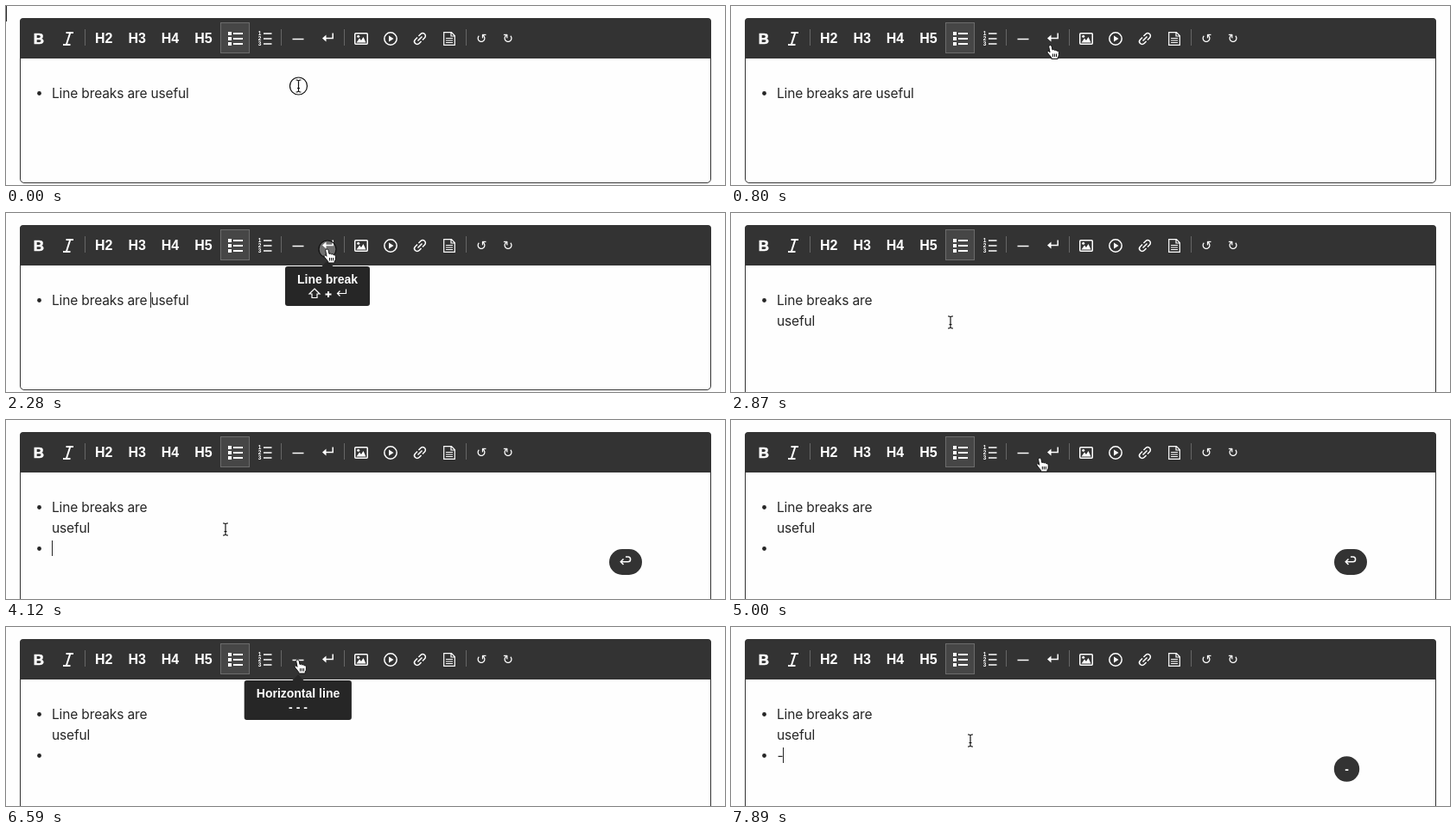
An HTML page for the animation above (8 s loop, 832 px wide and 208 px high).

```html
<!DOCTYPE html>
<html lang="en">
<head>
<meta charset="utf-8">
<title>Editor line breaks</title>
<style>
html, body { margin: 0; width: 100%; height: 100%; overflow: hidden; background: #fefefe; }
svg { display: block; width: 832px; height: 208px; }
.body { font: 15.5px Inter, sans-serif; letter-spacing: -0.14px; fill: #262626; }
.bold { font: bold 16px "Liberation Sans", Arial, sans-serif; fill: #fff; text-anchor: middle; }
.tip { font-size: 14px; }
.icon { fill: none; stroke: #fff; stroke-width: 1.5; }
.thin { stroke-width: 1.2; }
.thick { stroke-width: 2; }
.solid { fill: #fff; stroke: none; }
.digit { font: bold 6.5px "Liberation Sans", Arial, sans-serif; fill: #fff; }
.turn { font: 15px "DejaVu Sans", sans-serif; fill: #fff; text-anchor: middle; }
</style>
</head>
<body>
<svg viewBox="0 0 832 208" xmlns="http://www.w3.org/2000/svg">
  <rect id="frame" x="16.5" y="14.5" width="799" height="191" rx="4.5" fill="#fefefe" stroke="#333"/>
  <path d="M16 61V18a4 4 0 0 1 4-4H812a4 4 0 0 1 4 4V61Z" fill="#333"/>
  <rect x="248.5" y="19.5" width="33" height="35" fill="#464646" stroke="#6c6c6c"/>
  <path d="M91.5 27V46M318.5 27V46M391.5 27V46M532.5 27V46" stroke="#666"/>

  <g class="bold">
    <text x="38" y="44" font-size="17" stroke="#fff" stroke-width=".5">B</text>
    <text x="113.3" y="43">H2</text>
    <text x="151.7" y="43">H3</text>
    <text x="190" y="43">H4</text>
    <text x="228.5" y="43">H5</text>
  </g>
  <g class="icon">
    <path class="thick" d="M69.5 31H78M66 45H74.5M74.3 31L69.8 45"/>
    <path class="solid" d="M257 30h4v4h-4zM257 36h4v4h-4zM257 42h4v4h-4z"/>
    <path class="thick" d="M263 32H274M263 38H274M263 44H274"/>
    <path d="M298 32H307.5M298 38H307.5M298 44H307.5"/>
    <path d="M331.5 38.5H344.5"/>
    <path d="M378.2 31.5V37.5H369"/>
    <path class="solid" d="M366 37.5L370.5 33.5V41.5Z"/>
    <rect x="403.75" y="31.75" width="14.5" height="12.5" rx="1"/>
    <path class="solid" d="M405.5 42.5L409 37.5L411 40L413.5 36L416.5 42.5Z"/>
    <circle class="solid" cx="407.7" cy="35.3" r="1.5"/>
    <circle cx="445" cy="38" r="7.2"/>
    <path class="solid" d="M443 34.5V41.5L448.5 38Z"/>
    <path transform="translate(479 38) rotate(-45)" d="M-1 -3.2H-4.5a3.2 3.2 0 0 0 0 6.4H-1M1 -3.2H4.5a3.2 3.2 0 0 1 0 6.4H1M-3.5 0H3.5"/>
    <path class="thin" d="M506.7 30.7H515.5L519.3 34.5V45.4H506.7ZM515 31V35H519M509 37.5H517M509 40H517M509 42.5H517"/>
  </g>
  <g class="digit">
    <text x="291.8" y="34.3">1</text><text x="291.8" y="40.3">2</text><text x="291.8" y="46.3">3</text>
  </g>
  <g class="turn">
    <text x="550.3" y="43">↺</text><text x="580.8" y="43">↻</text>
  </g>

  <g class="body">
    <circle cx="38.5" cy="101.5" r="2.4"/>
    <text id="line1" x="53" y="107"></text>
    <text id="line2" x="53" y="131">useful</text>
    <circle id="bullet" cx="38.5" cy="149.5" r="2.4"/>
    <text id="dash" x="53.5" y="155">-</text>
    <rect id="caret" width="1" height="18"/>
  </g>

  <g id="enterKey">
    <rect x="698" y="150" width="38" height="30" rx="15" fill="#333"/>
    <path class="icon" d="M714.5 161.5L711.3 164.7L714.5 168M711.3 164.7H719.8a2.8 2.8 0 0 0 0 -5.6H717"/>
  </g>
  <g id="dashKey">
    <circle cx="712.5" cy="165" r="14.7" fill="#333"/>
    <text class="bold tip" x="712.5" y="170">-</text>
  </g>

  <g id="breakTip">
    <path d="M365.5 62L372 55.5L378.5 62Z" fill="#262626"/>
    <rect x="323" y="62" width="98" height="46" rx="3" fill="#262626"/>
    <text class="bold tip" x="372" y="82">Line break</text>
    <g class="icon">
      <path class="thin" d="M357 88L363 94H360V98.5H354V94H351Z"/>
      <path class="thick" d="M369.5 94.5H376.5M373 91V98"/>
      <path class="thin" d="M393.5 88.5V93.5H383.5M386.5 90.5L383.5 93.5L386.5 96.5"/>
    </g>
  </g>
  <g id="lineTip">
    <path d="M331.5 62L338 55.5L344.5 62Z" fill="#262626"/>
    <rect x="275.7" y="62" width="124.2" height="46" rx="3" fill="#262626"/>
    <text class="bold tip" x="338" y="82">Horizontal line</text>
    <text class="bold tip" x="338" y="98">- - -</text>
  </g>

  <g id="pointer">
    <circle id="ring" r="10" fill="#fff" fill-opacity=".3" stroke="#111" stroke-width="1.2"/>
    <path id="beam" d="M-3 -7H-1.5L0 -6L1.5 -7H3M-3 7H-1.5L0 6L1.5 7H3M0 -6V6M-1.5 2.5H1.5" fill="none" stroke="#111" stroke-width="1.2"/>
    <path id="hand" d="M-2.3 1.7Q-2.3 0 -.6 0Q.9 0 1.2 1.7L2 5.5Q3.5 4.3 4.4 5.9Q6.2 4.9 7.1 6.7Q9.2 6 9.4 8.2V11Q9.4 13 8.2 14V16H.8V14.500L-3.7 9Q-4.4 7.300 -3.200 6.800Q-2.100 6.700 -1 8.300ZM2.500 10V13.500M4.500 10V13.500M6.500 10V13.500" fill="#fff" stroke="#111"/>
  </g>
</svg>
<script>
const LOOP = 8000, STEP = 57;
const $ = id => document.getElementById(id);
const show = (id, o) => $(id).setAttribute("opacity", +o);
const place = (id, x, y) => $(id).setAttribute("transform", `translate(${x.toFixed(1)} ${y.toFixed(1)})`);
const clamp = v => Math.max(0, Math.min(1, v));
const steps = ms => Math.floor((ms + 4) / STEP);

// Screen updates come in steps, each journey ends at its stated time
const moves = [
  { end: 850, count: 7, path: [[338.5, 93], [358, 66], [372, 42]] },
  { end: 2870, count: 6, path: [[372, 42], [330, 88], [254, 127]] },
  { end: 5230, count: 12, path: [[254, 127], [318, 136], [384, 92], [356, 42], [338, 38]] },
  { end: 7240, count: 5, path: [[338, 38], [318, 88], [277, 132]] }
];

// Each edit puts the caret somewhere and restarts its blinking
const edits = [
  { at: 60, x: 167, y: 92 },
  { at: 2340, x: 53, y: 116 },
  { at: 3290, x: 97, y: 116 },
  { at: 4120, x: 53, y: 140 },
  { at: 7890, x: 60, y: 140 }
];
const clicks = [0, 2280, 3230];

// Catmull-Rom curve through the waypoints
function along(pts, u) {
  const n = pts.length - 1, i = Math.min(n - 1, Math.floor(u * n)), f = u * n - i;
  const p = k => pts[Math.max(0, Math.min(n, k))];
  return [0, 1].map(c => {
    const [a, b, d, e] = [p(i - 1)[c], p(i)[c], p(i + 1)[c], p(i + 2)[c]];
    return b + f / 2 * (d - a + f * (2 * a - 5 * b + 4 * d - e + f * (3 * (b - d) + e - a)));
  });
}

function pointerAt(t) {
  let pos = moves[0].path[0];
  for (const { end, count, path } of moves) {
    const u = clamp(1 + steps(t - end) / count);
    if (u > 0) pos = along(path, u * (1.3 - 0.3 * u));
  }
  return pos;
}

function drawCaret(t) {
  const edit = edits.filter(e => e.at <= t).pop();
  show("caret", edit && (t - edit.at) % 1005 < 460);
  if (edit) place("caret", edit.x, edit.y);
}

function drawTip(id, t, start, end) {
  const o = t < start || t >= end ? 0 : clamp(0.7 + 0.2 * steps(t - start));
  show(id, o);
  place(id, 0, -10 * (1 - o));
}

function draw(t) {
  const broken = t >= 2340, item = t >= 4120, typed = t >= 7890;
  $("frame").setAttribute("height", broken ? 215 : 191);
  $("line1").textContent = broken ? "Line breaks are" : "Line breaks are useful";
  show("line2", broken);
  show("bullet", item);
  show("dash", typed);
  show("dashKey", typed);
  show("enterKey", item && clamp(t < 6130 ? 1 : 0.6 - 0.3 * steps(t - 6130)));

  drawCaret(t);
  drawTip("breakTip", t, 1690, 2340);
  drawTip("lineTip", t, 6130, 7070);

  const [x, y] = pointerAt(t);
  const hand = y > 19 && y < 55;
  place("pointer", x, y);
  show("hand", hand);
  show("beam", !hand);
  show("ring", clicks.some(c => t >= c && t < c + 60));
}

function frame() {
  draw(performance.now() % LOOP);
  requestAnimationFrame(frame);
}
frame();
</script>
</body>
</html>
```
